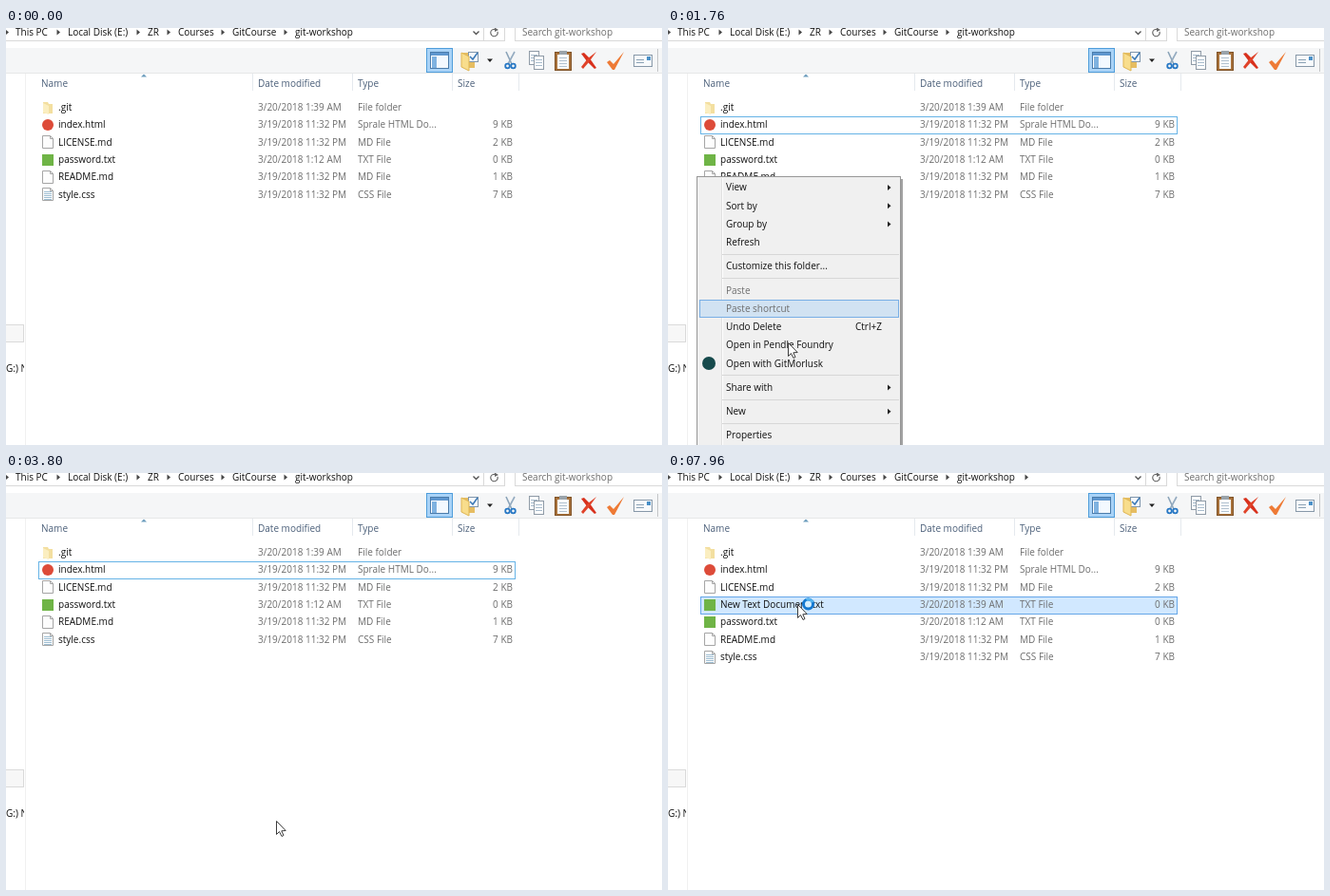
Recreate the animation shown at these times as an HTML page with a canvas. Size 690 px wide and 439 px high, loop 8 s.

```html
<!DOCTYPE html>
<html lang="en">
<head>
<meta charset="utf-8">
<title>File explorer</title>
<style>
html, body { margin: 0; width: 690px; height: 439px; overflow: hidden; background: #fff; }
canvas { display: block; width: 690px; height: 439px; }
</style>
</head>
<body>
<canvas id="stage"></canvas>
<script>
const W = 690, H = 439, LOOP = 8000;
const canvas = document.getElementById('stage');
const ratio = window.devicePixelRatio || 1;
canvas.width = W * ratio;
canvas.height = H * ratio;
const c = canvas.getContext('2d');
const FONT = '10px "Open Sans", "Noto Sans", sans-serif';

const ROW_TOP = 75, ROW_H = 18.33, PITCH = 19.25;
const HOVER_LAG = 80;
const NEW_NAME = 'New Text Document';

// name, modified, type, size, icon
const FILES = [
  ['.git', '3/20/2018 1:39 AM', 'File folder', '', 'paleFolder'],
  ['index.html', '3/19/2018 11:32 PM', 'Sprale HTML Do...', '9 KB', 'web'],
  ['LICENSE.md', '3/19/2018 11:32 PM', 'MD File', '2 KB', 'page'],
  ['password.txt', '3/20/2018 1:12 AM', 'TXT File', '0 KB', 'text'],
  ['README.md', '3/19/2018 11:32 PM', 'MD File', '1 KB', 'page'],
  ['style.css', '3/19/2018 11:32 PM', 'CSS File', '7 KB', 'lines']
];
const NEW_FILE = [NEW_NAME + '.txt', '3/20/2018 1:39 AM', 'TXT File', '0 KB', 'text'];
const FILES_AFTER = [...FILES.slice(0, 3), NEW_FILE, ...FILES.slice(3)];

const MAIN = layout({ x: 30, y: 156, w: 215, h: 300, gutter: 27, textX: 61, iconX: 43 }, [
  { label: 'View', more: true }, { label: 'Sort by', more: true },
  { label: 'Group by', more: true }, { label: 'Refresh' }, null,
  { label: 'Customize this folder...' }, null,
  { label: 'Paste', off: true }, { label: 'Paste shortcut', off: true },
  { label: 'Undo Delete', key: 'Ctrl+Z' }, { label: 'Open in Pendle Foundry' },
  { label: 'Open with GitMorlusk', icon: 'teal' }, null,
  { label: 'Share with', more: true }, null,
  { label: 'New', more: true }, null, { label: 'Properties' }
]);
const SUB = layout({ x: 240, y: 136, w: 227, h: 280, gutter: 26, textX: 270, iconX: 252 }, [
  { label: 'Folder', icon: 'folder' }, { label: 'Shortcut', icon: 'shortcut' }, null,
  { label: 'Morvolast Sorrel Database', icon: '#a4373a' },
  { label: 'Bitmap image', icon: 'picture' },
  { label: 'Contact', icon: 'card' },
  { label: 'Morvolast Prose Document', icon: '#2b579a' },
  { label: 'MQL5 Source File', icon: '#d9b36a' },
  { label: 'Morvolast SlideMarch Presentation', icon: '#d24726' },
  { label: 'Olbex Tintbarrow Image 13', icon: '#14264f' },
  { label: 'Morvolast Leaflayer Document', icon: '#1f7a6a' },
  { label: 'TelVUR archive', icon: '#7b3f78' },
  { label: 'Text Document', icon: 'text' },
  { label: 'Morvolast Tally Worksheet', icon: '#217346' },
  { label: 'TelVUR ZIP archive', icon: '#7b3f78' }
]);

// time, x, y of the pointer
const PATH = [
  [80, 0, 373], [240, 28, 310], [420, 52, 225], [560, 54, 180], [680, 42, 163],
  [840, 31, 156], [920, 30, 155], [1280, 30, 155], [1400, 35, 164], [1500, 50, 190],
  [1700, 112, 310], [1920, 164, 388], [2000, 168, 391], [2160, 172, 396],
  [2760, 172, 396], [2920, 228, 397], [3040, 256, 390], [3160, 268, 352],
  [3240, 271.5, 356], [3400, 280, 364], [3560, 284, 366], [3960, 284, 366],
  [4320, 292, 359], [6080, 292, 359], [6120, 280, 300], [6200, 254, 160],
  [6280, 232, 70], [6400, 228, 70], [6520, 199, 119.5], [6680, 202, 155],
  [6800, 204, 148], [6960, 204, 131], [7400, 204, 131], [7440, 196, 132],
  [7600, 156, 136], [7760, 136, 138], [LOOP, 136, 138]
];

function layout(menu, entries) {
  let y = menu.y + 12;
  menu.items = [];
  menu.rules = [];
  for (const e of entries) {
    if (!e) { menu.rules.push(y - PITCH / 2 + 3); y += 6; continue; }
    menu.items.push({ ...e, y });
    y += PITCH;
  }
  return menu;
}

function box(x, y, w, h, fill, line) {
  if (fill) { c.fillStyle = fill; c.fillRect(x, y, w, h); }
  if (line) {
    c.strokeStyle = line;
    c.lineWidth = 1;
    c.strokeRect(x + .5, y + .5, w - 1, h - 1);
  }
}

function text(s, x, y, color = '#111', align = 'left') {
  c.fillStyle = color;
  c.textAlign = align;
  c.fillText(s, x, Math.round(y + 3.4));
}

function poly(points, fill, line, width = 1) {
  c.beginPath();
  points.forEach(([x, y], i) => i ? c.lineTo(x, y) : c.moveTo(x, y));
  if (fill) { c.closePath(); c.fillStyle = fill; c.fill(); }
  if (line) { c.strokeStyle = line; c.lineWidth = width; c.stroke(); }
}

function disc(x, y, r, fill, line, width = 1) {
  c.beginPath();
  c.arc(x, y, r, 0, 7);
  if (fill) { c.fillStyle = fill; c.fill(); }
  if (line) { c.strokeStyle = line; c.lineWidth = width; c.stroke(); }
}

function arrow(x, y, color = '#222') {
  poly([[x - 1.5, y - 3], [x + 2, y], [x - 1.5, y + 3]], color);
}

function folder(x, y, main, back) {
  poly([[x - 5, y - 6], [x, y - 6], [x + 1, y - 4], [x + 5, y - 4], [x + 5, y + 6], [x - 5, y + 6]], back);
  poly([[x - 5, y - 5], [x + 1, y - 2], [x + 1, y + 7], [x - 5, y + 5]], main);
}

function page(x, y, lines) {
  poly([[x - 5.5, y - 6.5], [x + 2.5, y - 6.5], [x + 5.5, y - 3.5], [x + 5.5, y + 6.5],
    [x - 5.5, y + 6.5], [x - 5.5, y - 6.5]], '#fdfdfd', '#a5a5a5');
  poly([[x + 2.5, y - 6.5], [x + 2.5, y - 3.5], [x + 5.5, y - 3.5]], null, '#a5a5a5');
  if (lines) for (let i = -3; i < 6; i += 2) box(x - 4, y + i, 8, 1, '#9dbdd2');
}

function icon(kind, x, y) {
  x = Math.round(x);
  y = Math.round(y);
  switch (kind) {
    case 'paleFolder': folder(x, y, '#fbeec0', '#f3dfa0'); break;
    case 'folder': folder(x, y, '#fbe29a', '#e8bf59'); break;
    case 'web': disc(x, y, 6, '#dd4b39'); break;
    case 'teal': disc(x, y, 7, '#164a4c'); break;
    case 'page': page(x, y); break;
    case 'lines': page(x, y, true); break;
    case 'text': box(x - 6, y - 6, 12, 12, '#6fb446'); break;
    case 'shortcut':
      box(x - 6, y - 6, 12, 12, '#fff', '#a0a0a0');
      poly([[x - 3, y + 4], [x - 2, y], [x + 2, y - 2]], null, '#23408f', 2);
      poly([[x - 1, y - 4], [x + 4, y - 4], [x + 4, y + 1]], '#23408f');
      break;
    case 'picture':
      box(x - 6, y - 5, 12, 10, '#58a8dc', '#e0e0e0');
      box(x - 5, y + 1, 10, 3, '#2f6b45');
      disc(x + 1, y - 1, 2, '#f5c84c');
      break;
    case 'card':
      box(x - 7, y - 4, 14, 10, '#f4faff', '#6ea5c8');
      box(x - 5, y - 1, 4, 4, '#5b9bc4');
      box(x + 1, y - 1, 4, 1, '#7fa9c2');
      box(x + 1, y + 2, 4, 1, '#7fa9c2');
      break;
    default: if (kind) box(x - 6, y - 6, 12, 12, kind);
  }
}

function toolbar() {
  box(0, 21, W, 27, '#f5f6f7');
  box(0, 47, W, 1, '#e6e7e8');
  box(442, 21, 28, 26, '#a9d3f7', '#4f9ddb');
  box(446, 25, 20, 18, '#fff', '#4b7cab');
  box(447, 26, 18, 3, '#5f97cf');
  box(448, 30, 5, 12, '#7fb2e0');
  box(454, 30, 11, 12, '#f3f9ff');

  box(480, 26, 13, 16, '#e6bd62');
  box(486, 25, 11, 11, '#f4f8fc', '#7f96ad');
  poly([[488, 30], [491, 33], [496, 26]], null, '#3a78b5', 1.5);
  poly([[479, 26], [487, 30], [487, 45], [479, 41]], '#f8dd8c', '#dfb553');
  poly([[506, 32.5], [512, 32.5], [509, 36]], '#222');

  poly([[526, 25], [532, 38]], null, '#8aa3b8', 1.6);
  poly([[535, 25], [528, 38]], null, '#94abc0', 1.6);
  disc(527.5, 40, 2.3, null, '#2878c4', 1.8);
  disc(533.5, 40, 2.3, null, '#2878c4', 1.8);

  for (const [x, y] of [[550, 24], [555, 29]]) {
    box(x, y, 11, 15, '#fff', '#8e9aa6');
    for (let i = 4; i < 13; i += 3) box(x + 2, y + i, 7, 1, '#a9bccd');
  }

  box(577, 25, 18, 20, '#a8713a', '#7f5226');
  box(580, 28, 12, 15, '#f8fafc');
  box(582, 24, 8, 4, '#9aa3aa');
  for (let i = 31; i < 42; i += 3) box(582, i, 8, 1, '#b2c2d0');

  poly([[605, 27], [608, 26], [614, 32], [621, 42], [619, 43], [611, 35]], '#d8301c');
  poly([[621, 25], [613, 36], [607, 43], [605, 41], [612, 32]], '#e0432a');
  poly([[632, 36], [635, 34], [639, 38], [650, 25], [640, 44], [638, 44]], '#ee7a35');

  box(660, 28, 20, 13, '#f8fafc', '#8798a8');
  box(663, 33, 8, 1, '#8ba2b5');
  box(663, 36, 8, 1, '#8ba2b5');
  box(674, 30, 4, 4, '#4a90c8');
  box(685, 22, 1, 24, '#c4c6c8');
}

function frame(t) {
  box(0, 0, W, H, '#fff');
  box(-1, -5, 526, 19, '#fff', '#d9d9d9');
  box(535, -5, 160, 19, '#fff', '#d9d9d9');
  box(502, 0, 1, 13, '#d9d9d9');
  const crumbs = [['This PC', 10], ['Local Disk (E:)', 65], ['ZR', 149],
    ['Courses', 181], ['GitCourse', 238], ['git-workshop', 304]];
  for (const [s, x] of crumbs) {
    text(s, x, 4.5);
    arrow(x === 10 ? 1 : x - 10, 4.5, '#444');
  }
  if (t >= 3880) arrow(377, 4.5, '#444');
  poly([[491.5, 3.5], [494.5, 6.5], [497.5, 3.5]], null, '#555', 1.4);
  c.beginPath();
  c.arc(513.5, 5, 3.7, -.3, 5);
  c.strokeStyle = '#666';
  c.lineWidth = 1.2;
  c.stroke();
  poly([[514, -.5], [518, 2], [514, 4]], '#666');
  text('Search git-workshop', 543, 4.5, '#6d6d6d');

  toolbar();

  box(20, 48, 1, H - 48, '#f0f0f0');
  box(-1, 312, 20, 19, '#f7f7f7', '#dadada');
  c.save();
  c.beginPath();
  c.rect(0, 340, 19, 40);
  c.clip();
  text('G:) N', 0, 358.3);
  c.restore();

  const head = '#4c607a';
  text('Name', 37, 58.5, head);
  text('Date modified', 265, 58.5, head);
  text('Type', 370, 58.5, head);
  text('Size', 475, 58.5, head);
  for (const x of [259, 364, 469, 539]) box(x, 48, 1, 18, '#e5e9ee');
  poly([[142, 51.5], [145, 48.5], [148, 51.5]], '#6d9dbd');
}

function rowBox(i, fill, line) {
  const y = Math.round(ROW_TOP + ROW_H * i);
  box(34, y, 502, 19, fill, line);
}

function files(t, p) {
  const made = t >= 4000, menuOpen = t >= 1160 && t < 3800;
  const list = made ? FILES_AFTER : FILES;
  let hot = -1;
  if (p && !menuOpen && p.x >= 34 && p.x < 536) hot = Math.floor((p.y - ROW_TOP) / ROW_H);

  if (hot >= 0 && hot < list.length && !(made && hot === 3)) rowBox(hot, '#e5f3fb', '#70c0e7');
  if (made) {
    if (hot === 3) rowBox(3, '#d1e8ff', '#66a7e8');
    else rowBox(3, '#cbe8f6', '#4aa9d8');
  } else if (t >= 1160) rowBox(1, null, '#66b3e6');

  list.forEach(([name, date, type, size, kind], i) => {
    const y = ROW_TOP + ROW_H * (i + .5) - .5;
    icon(kind, 44, y);
    text(name, 55, y);
    text(date, 265, y, '#6d6d6d');
    text(type, 370, y, '#6d6d6d');
    text(size, 533, y, '#6d6d6d', 'right');
  });
  if (t >= 4080 && t < 7120) rename(t);
}

function rename(t) {
  const y = ROW_TOP + ROW_H * 3.5 - .5;
  box(51, 130, 140, 17, '#fff', '#000');
  text(NEW_NAME + '.txt', 55, y);
  c.textAlign = 'left';
  const w = Math.round(c.measureText(NEW_NAME).width);
  box(55, 132, w, 13, '#3399ff');
  text(NEW_NAME, 55, y, '#fff');
  const lit = t < 4880 || (t >= 5320 && t < 5880) || t >= 6440;
  if (lit) box(55 + w, 132, 1, 13, '#000');
}

function itemAt(menu, p) {
  if (p.x < menu.x + 3 || p.x > menu.x + menu.w - 2) return null;
  return menu.items.find(i => Math.abs(p.y - i.y) <= PITCH / 2);
}

function drawMenu(m, hot, alpha) {
  c.globalAlpha = alpha;
  box(m.x + m.w, m.y + 3, 2, m.h - 1, '#a2a2a2');
  box(m.x + 3, m.y + m.h, m.w - 3, 2, '#a2a2a2');
  box(m.x, m.y, m.w, m.h, '#f0f0f0', '#979797');
  box(m.x + m.gutter - 1, m.y + 2, 1, m.h - 4, '#e0e0e0');
  box(m.x + m.gutter, m.y + 2, 1, m.h - 4, '#fff');
  for (const r of m.rules) box(m.x + m.gutter, Math.round(r - .5), m.w - m.gutter - 2, 1, '#d7d7d7');
  for (const i of m.items) {
    if (i === hot) box(m.x + 3, Math.round(i.y - 9.5), m.w - 5, 19, '#d1e2f2', '#78aee5');
    icon(i.icon, m.iconX, i.y);
    text(i.label, m.textX, i.y, i.off ? '#6d6d6d' : '#111');
    if (i.key) text(i.key, 197, i.y);
    if (i.more) arrow(232.5, i.y);
  }
  c.globalAlpha = 1;
}

function menus(t) {
  if (t < 1160 || t >= 3800) return;
  const p = pointerAt(t - HOVER_LAG);
  const fade = (start, from) => Math.min(1, from + Math.floor((t - start) / 80) * .25);
  const subOpen = t >= 2480;
  const newItem = MAIN.items.find(i => i.label === 'New');
  drawMenu(MAIN, subOpen ? newItem : itemAt(MAIN, p), fade(1160, .5));
  if (subOpen) drawMenu(SUB, itemAt(SUB, p), fade(2480, .5));
}

function pointerAt(t) {
  if (t < PATH[0][0]) return null;
  const k = PATH.findIndex(q => q[0] > t);
  const [t0, x0, y0] = PATH[k - 1], [t1, x1, y1] = PATH[k];
  const f = (t - t0) / (t1 - t0);
  return { x: x0 + (x1 - x0) * f, y: y0 + (y1 - y0) * f };
}

function pointer(t, p) {
  if (!p) return;
  const x = Math.round(p.x) + .5, y = Math.round(p.y) + .5;
  const shape = [[0, 0], [0, 14], [3, 11], [5.5, 16], [7.5, 15], [5.3, 10.3], [9.7, 10], [0, 0]];
  poly(shape.map(([a, b]) => [x + a, y + b]), '#fff', '#3c3c3c');
  if (t >= 7960) {
    disc(147.5, 138, 5, '#d5efff', '#1478d0', 3);
    c.beginPath();
    c.arc(147.5, 138, 5, -2, -.4);
    c.strokeStyle = '#55b4ef';
    c.stroke();
  }
}

function draw(now) {
  const t = Math.floor((now % LOOP) / 40) * 40;
  c.setTransform(ratio, 0, 0, ratio, 0, 0);
  c.font = FONT;
  const p = pointerAt(t);
  frame(t);
  files(t, p);
  menus(t);
  pointer(t, p);
}

let start;
function tick(now) {
  start ??= now;
  draw(Math.max(0, now - start));
  requestAnimationFrame(tick);
}
draw(0);
requestAnimationFrame(tick);
</script>
</body>
</html>
```
